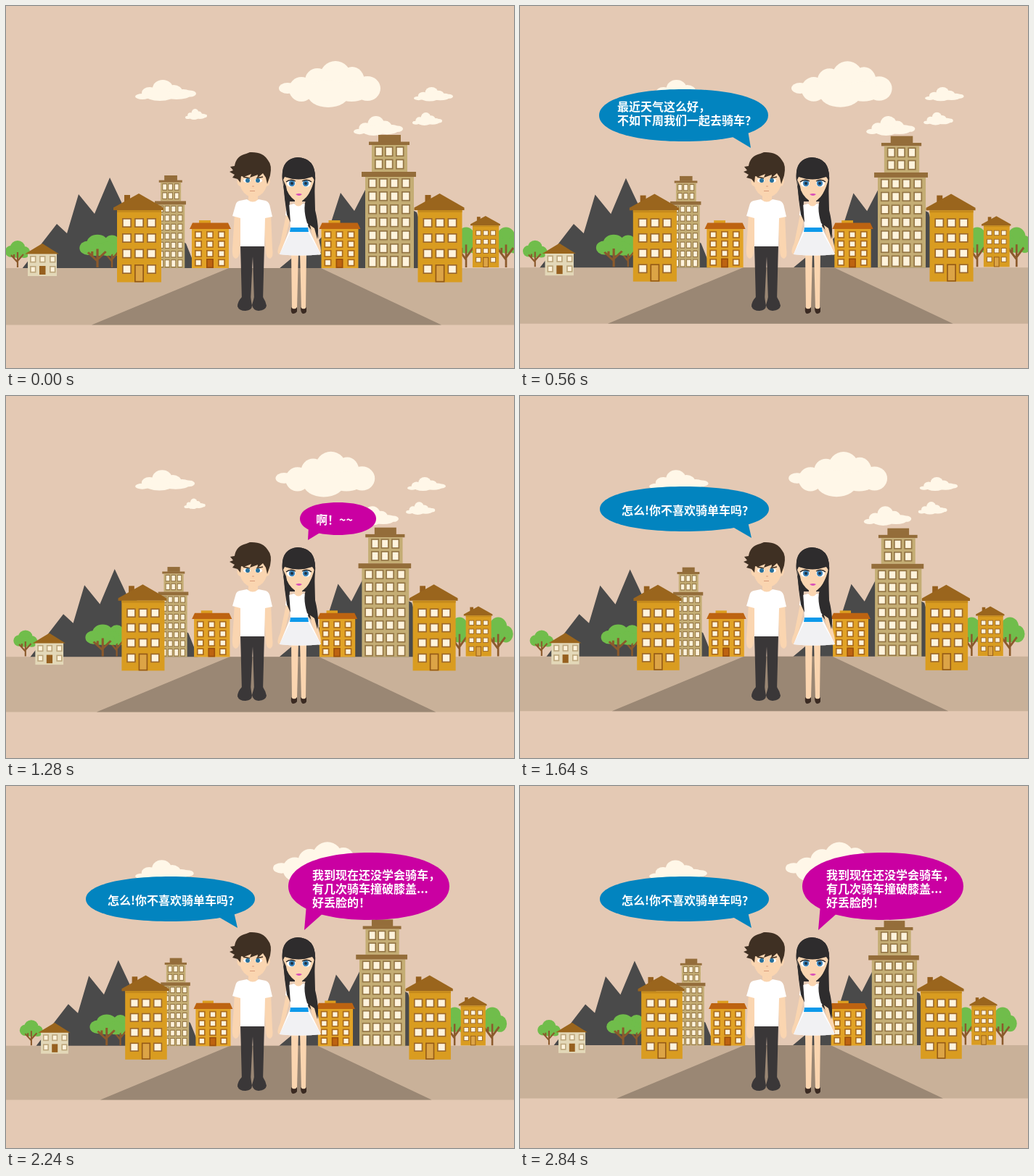
Write an HTML page that moves like this. It is 700 px wide and 500 px high and loops after 2.88 s.

```html
<!DOCTYPE html>
<html lang="zh-CN">
<head>
<meta charset="utf-8">
<style>
html, body { margin: 0; width: 100%; height: 100%; overflow: hidden; background: #e4c9b4; }
svg { display: block; }
text { font: 700 16px "Noto Sans CJK SC", "Noto Sans CJK", sans-serif; fill: #fff; }
</style>
</head>
<body>
<svg width="700" height="500" viewBox="0 0 700 500">
  <g id="sky" fill="#fff7e8"></g>
  <g id="lowCloud" fill="#fff7e8"></g>
  <g id="hills" fill="#4a4a4a">
    <path d="M22 363L70 301L84 314L100 260L122 287L143 237L160 273L205 300L248 328L262 363Z"/>
    <path d="M376 363L400 343L425 330L445 308L461 258L480 283L497 250L566 285L590 363Z"/>
  </g>
  <g id="ground">
    <path fill="#c9b199" d="M-60 362H780V440.5H-60Z"/>
    <path fill="#9a8774" d="M307 362H434L600 440.5H118Z"/>
  </g>
  <g id="town"></g>

  <g id="man">
    <path fill="#fad5b0" d="M315 287L312 335Q311 347 316 349Q322 348 322 338L325 290ZM365 287L367 335Q369 347 364 349Q358 348 358 338L355 290ZM334 256H347V274H334Z"/>
    <path fill="#3a3738" d="M323 330H356L354 408H342L340 346L337 408H325Z"/>
    <path fill="#3a3738" d="M325 402Q319 408 319 415Q321 421 330 421Q339 420 339 414L337 402ZM342 402L339 413Q340 420 348 421Q358 420 359 414Q358 408 354 402Z"/>
    <path fill="#fff" d="M332 267Q340 274 348 267L358 269Q363 271 364 278L367 291L357 293L356 332H323L323 293L312 290L316 276Q317 270 322 269Z"/>
    <path fill="#fad5b0" d="M322 228H360L362 238Q366 240 362 248L359 249Q355 262 341 265Q327 262 323 249Q317 247 319 239Z"/>
    <path fill="#3f3023" d="M309 222L315 221Q317 207 331 204L336 202Q354 201 361 213Q367 220 364 234L360 246L358 237L354 231L346 238L347 233L336 237L338 232L328 236L324 235L323 244L319 239L312 237L315 233L308 229L313 227Z"/>
    <path fill="none" stroke="#3f3023" stroke-width="1.6" d="M327 236L336 238M345 238L354 236"/>
    <g fill="#fff"><ellipse cx="332" cy="241" rx="5" ry="3"/><ellipse cx="348" cy="241" rx="5" ry="3"/></g>
    <g fill="#28719b"><circle cx="333" cy="241" r="3"/><circle cx="347" cy="241" r="3"/></g>
    <path fill="none" stroke="#d99a78" d="M339 249H342M336 255.5H343"/>
  </g>

  <g id="woman">
    <path fill="#2e2c2d" d="M381 240Q378 211 402 209Q428 210 426 242L424 270L431 322L413 300V270H391L389 298L385 270Z"/>
    <path fill="#fad5b0" d="M387 283L378 327Q372 340 376 343Q381 342 382 334L392 291ZM423 283L432 327Q436 341 432 344Q428 343 427 336L416 291ZM393 340H403L401 418H394ZM405 340H414L413 418H407Z"/>
    <path fill="#fad5b0" d="M398 264H408V278H398Z"/>
    <path fill="#fff" d="M397 273Q403 280 409 273L420 274Q425 278 426 288L417 291L416 306L434 343Q406 346 377 343L392 306L391 291L385 289Q386 277 390 275Z"/>
    <path fill="#f1f1f3" d="M392 312H416L434 343Q406 346 377 343Z"/>
    <path fill="#0c99ea" d="M392 306H416L417 312H391Z"/>
    <path fill="#fad5b0" d="M382 234H424L425 246Q422 250 421 252Q417 264 404 272Q391 266 386 252Q381 250 382 240Z"/>
    <path fill="#2e2c2d" d="M381 242Q378 211 402 209Q428 210 426 242L422 236Q403 243 384 236ZM382 240L386 249L390 272L392 299L387 288L384 266ZM425 240L421 252L413 268Q409 280 415 300L425 307L429 322Q432 306 426 282Z"/>
    <g fill="#fff"><ellipse cx="393" cy="245" rx="6" ry="5"/><ellipse cx="414" cy="245" rx="6" ry="5"/></g>
    <g fill="#3b83b8"><circle cx="394" cy="245" r="4.2"/><circle cx="413" cy="245" r="4.2"/></g>
    <g fill="#20303f"><circle cx="394" cy="245" r="2"/><circle cx="413" cy="245" r="2"/></g>
    <path fill="none" stroke="#2e2c2d" stroke-width="1.4" d="M386 243Q392 238 399 242M408 242Q415 238 421 243"/>
    <path fill="#d94fb8" d="M399 260Q404 258 408 260Q404 264 399 260Z"/>
    <path fill="#3a2a22" d="M393 416Q397 421 401 416L401 422Q399 425 395 425Q392 424 393 416ZM406 416Q410 421 414 416L414 422Q413 425 409 425Q406 424 406 416Z"/>
  </g>
  <g id="talk"></g>
</svg>
<script>
const LOOP = 2880, STEP = 40;
const get = id => document.getElementById(id);
const rect = (x, y, w, h, fill) => `<rect x="${x}" y="${y}" width="${w}" height="${h}" fill="${fill}"/>`;
const poly = (points, fill) => `<polygon points="${points}" fill="${fill}"/>`;
const ellipses = list => list.map(([x, y, rx, ry]) =>
  `<ellipse cx="${x}" cy="${y}" rx="${rx}" ry="${ry}"/>`).join('');
const place = (x, y, sx, sy, body) => `<g transform="translate(${x} ${y}) scale(${sx} ${sy})">${body}</g>`;
const pane = (x, y, w, h, frame, fill = '#fff3dc') =>
  rect(x, y, w, h, frame) + rect(x + 1.7, y + 1.7, w - 3.4, h - 3.4, fill);
const panes = (xs, ys, w, h, frame) =>
  ys.map(y => xs.map(x => pane(x, y, w, h, frame)).join('')).join('');

// Clouds
const bigCloud = ellipses([[12, 37.5, 12, 7.5], [31, 39, 17, 17], [53, 27, 17, 17], [78, 23, 22, 23],
  [101, 28, 17, 20], [122, 38, 18, 17], [68, 45, 29, 19], [100, 42, 24, 14]]);
const flatCloud = ellipses([[10, 23, 10, 4], [20, 18, 11, 8], [38, 12, 14, 12], [53, 16, 12, 9],
  [66, 19, 12, 6], [75, 19, 9, 4.5], [34, 21, 20, 8], [57, 22, 18, 5]]);
const wisp = (x, y, w, h) => place(x, y, w / 84, h / 29, flatCloud);
get('sky').innerHTML = place(376, 76, 1, 1, bigCloud) + wisp(178, 102, 84, 29) +
  wisp(247, 142, 30, 15) + wisp(562, 112, 54, 19.5) + wisp(560, 147, 41, 18);
get('lowCloud').innerHTML = wisp(479, 152, 68, 27);

// Town pieces, each measured from its own top left corner
const tree = (x, sx, sy) => place(x, 361, sx, sy,
  `<g fill="#70bd4b">${ellipses([[0, -28, 10, 9], [-9, -22, 8, 8], [9, -21, 8, 8], [0, -20, 12, 7]])}</g>
   <path d="M0 0V-21M0 -7L-9 -17M0 -9L8 -18M-5 -12V-18" fill="none" stroke="#8b5a2c" stroke-width="2.2"/>`);

const flats = rect(15, 2, 8, 16, '#955f1d') + poly('0,23 0,19.5 35,0 69,19.5 69,23', '#9a651d') +
  rect(5, 23, 61, 99.5, '#d99c20') + rect(5, 23, 61, 3, '#c58a1c') +
  panes([12, 29, 46], [34, 55, 76.5], 13, 13, '#9a672b') + panes([12, 46], [98], 13, 13, '#9a672b') +
  pane(29, 98, 13, 24.5, '#945a17', '#dca446');

const tower = rect(23, 0, 31, 10, '#946d3a') + rect(10, 9.5, 56, 4.5, '#946d3a') +
  rect(14, 14, 49, 37, '#c4ad74') + panes([18, 32, 47], [16, 33.5], 11.5, 14, '#927444') +
  rect(5, 58, 67, 126, '#c4ad74') + rect(0, 51, 75, 7, '#946d3a') +
  panes([9, 24, 39, 55], [60, 78, 96, 114, 132, 150], 12, 13.5, '#927444') +
  panes([9, 24, 39, 55], [167], 12, 16, '#927444');

const shop = rect(13, 0, 16, 4, '#dc9e20') + rect(3, 12, 51, 54, '#e2a326') +
  poly('4,3.5 53,3.5 57,12 0,12', '#bd6311') +
  panes([7, 23, 39], [15, 28, 41], 10, 10, '#a96a1d') + panes([7, 39], [53.5], 10, 10, '#a96a1d') +
  pane(23, 53, 10, 13, '#9c4f0b', '#bd6311');

const cottage = rect(4, 13, 40, 32, '#e3d8b8') + poly('0,14.5 24,0 47,14.5', '#9a651d') +
  panes([7, 20, 34], [17], 8.5, 9.5, '#bda77d') + panes([7, 34], [31], 8.5, 9.5, '#bda77d') +
  rect(20, 31, 8.5, 12, '#96601f');

get('town').innerHTML = tree(16, 1, 1) + tree(146, 1.1, 1.2) + tree(126, 1.45, 1.22) +
  tree(634, 1.2, 1.5) + tree(689, 1.25, 1.5) +
  place(205, 234, .573, .695, tower) + place(490, 178, 1, 1, tower) +
  place(253, 296, 1, 1, shop) + place(431.5, 296, 1, 1, shop) +
  place(26, 328, 1, 1, cottage) + place(148, 259, 1, 1, flats) +
  place(562.5, 259, 1, 1, flats) + place(640, 290, .594, .58, flats);

// Speech bubbles grow out of the tip of their tail
const BLUE = '#0284bf', PINK = '#ca00a2';
const bubbles = [
  { box: [225.5, 151, 116.5, 36], tip: [318, 196], root: [288, 178, 314, 172], fill: BLUE,
    from: 80, full: 400, until: 1120, x: 134, y: 145, lines: ['最近天气这么好，', '不如下周我们一起去骑车？'] },
  { box: [457.5, 169.5, 52.5, 22.5], tip: [416, 199], root: [417, 180, 434, 188], fill: PINK,
    from: 680, full: 1000, until: 1400, x: 427, y: 177, lines: ['啊！~~'] },
  { box: [226.5, 156, 116.5, 31], tip: [319, 196], root: [288, 178, 314, 174], fill: BLUE,
    from: 1320, full: 1640, until: LOOP, x: 140, y: 164, lines: ['怎么!你不喜欢骑单车吗？'] },
  { box: [500, 138.5, 111, 46.5], tip: [411, 199], root: [414, 164, 439, 174], fill: PINK,
    from: 1800, full: 2120, until: LOOP, x: 422, y: 129, lines: ['我到现在还没学会骑车，', '有几次骑车撞破膝盖...', '好丢脸的！'] }
];

function balloon([cx, cy, rx, ry]) {
  const a = rx * .6, b = ry * .6;
  return `M${cx - rx} ${cy}C${cx - rx} ${cy - b} ${cx - a} ${cy - ry} ${cx} ${cy - ry}` +
    `S${cx + rx} ${cy - b} ${cx + rx} ${cy}S${cx + a} ${cy + ry} ${cx} ${cy + ry}` +
    `S${cx - rx} ${cy + b} ${cx - rx} ${cy}Z`;
}

for (const b of bubbles) {
  const [x1, y1, x2, y2] = b.root;
  b.node = document.createElementNS('http://www.w3.org/2000/svg', 'g');
  b.node.innerHTML = `<path fill="${b.fill}" d="${balloon(b.box)}"/>` +
    `<path fill="${b.fill}" d="M${x1} ${y1}L${b.tip}L${x2} ${y2}Z"/>` +
    b.lines.map((s, i) => `<text x="${b.x}" y="${b.y + i * 19}">${s}</text>`).join('');
  get('talk').append(b.node);
}

function zoom(node, cx, cy, sx, sy = sx) {
  node.setAttribute('transform', `translate(${cx} ${cy}) scale(${sx} ${sy}) translate(${-cx} ${-cy})`);
}

function draw(t) {
  const p = t / (LOOP - STEP);
  zoom(get('sky'), 181, 112, 1 - .0515 * p, 1 - .045 * p);
  zoom(get('lowCloud'), 344, 172, 1 - .0664 * p, 1 - .03 * p);
  zoom(get('ground'), 344, 300, 1 - .0664 * p, 1 - .064 * p);
  for (const id of ['hills', 'town']) zoom(get(id), 352, 307, 1 - .0713 * p, 1 - .063 * p);
  for (const b of bubbles) {
    const size = Math.min(1, (t - b.from) / (b.full - b.from));
    const shown = size > 0 && t < b.until;
    b.node.style.display = shown ? '' : 'none';
    if (shown) zoom(b.node, ...b.tip, size);
  }
}

let start;
function tick(now) {
  start ??= now;
  draw(Math.floor((now - start) % LOOP / STEP) * STEP);
  requestAnimationFrame(tick);
}
draw(0);
requestAnimationFrame(tick);
</script>
</body>
</html>
```
